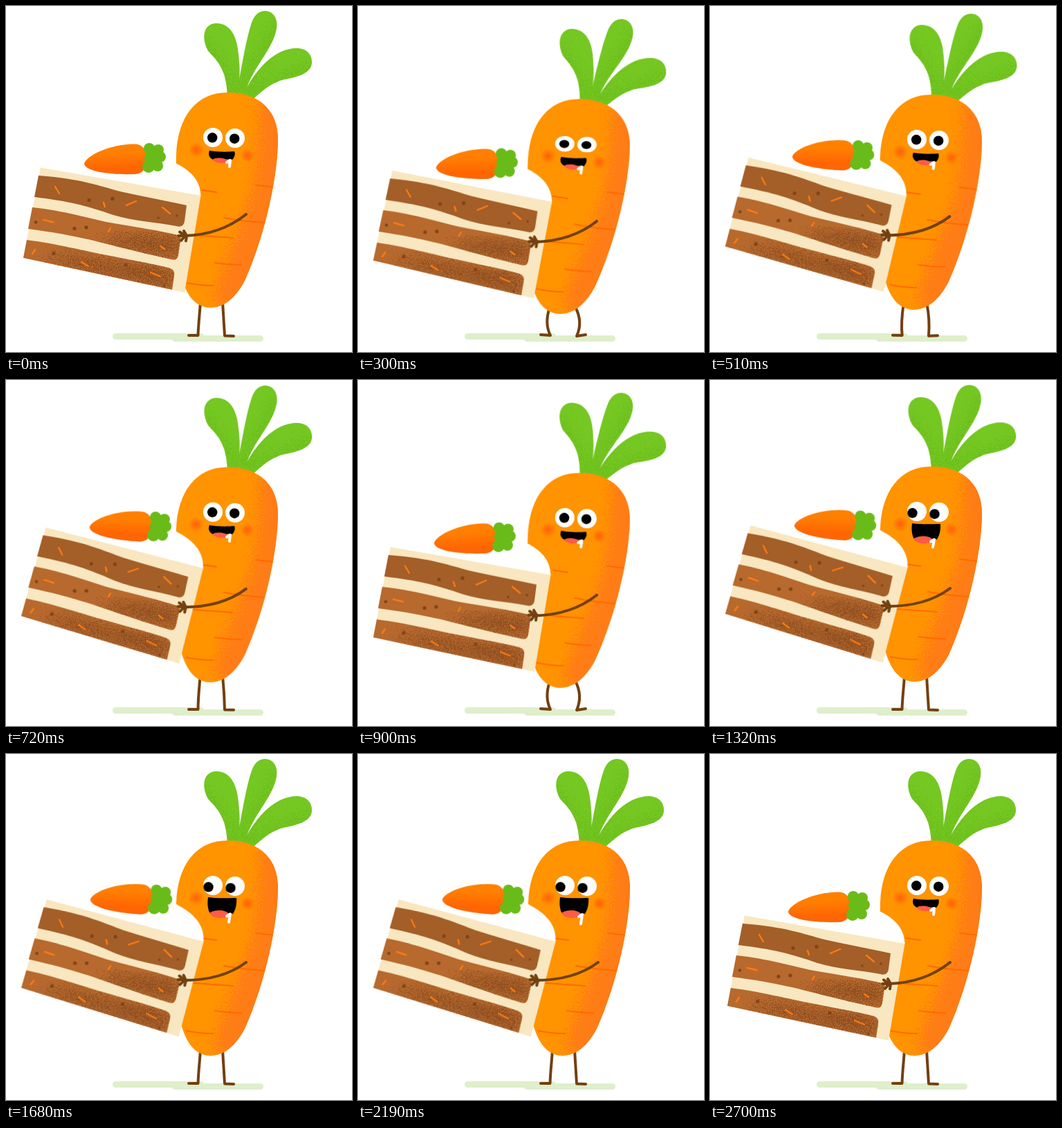
Write an HTML page without scripts that moves like this. It is 500x500 px and loops after 2.73 s.

```html
<!DOCTYPE html>
<html lang="en">
<head>
<meta charset="utf-8">
<title>Carrot with cake</title>
<style>
html, body { margin: 0; width: 100%; height: 100%; overflow: hidden; background: #fff; }
svg { display: block; width: 100vw; height: 100vh; }
.move { animation: 2.73s cubic-bezier(.45, 0, .55, 1) infinite; }
.line { fill: none; stroke-linecap: round; stroke-linejoin: round; }
.limb { stroke: #734010; stroke-width: 4; }
.crease { stroke: #ff6900; stroke-width: 2; }
.shred { stroke: #fa7b12; stroke-width: 2.4; }

/* Body bobs twice, then rests while the carrot stares at the cake. */
.body { animation-name: bob; transform-origin: 320px 180px; }
@keyframes bob {
  0%, 24.2%, 46.4%, 100% { transform: none; }
  10.4%, 34.2% { transform: translateY(9.5px) rotate(.85deg); }
}
.leaves { animation-name: sway; transform-origin: 338px 130px; }
@keyframes sway {
  0%, 25.5%, 51%, 100% { transform: none; }
  12% { transform: rotate(2.2deg); }
  38% { transform: rotate(3deg); }
}
.cake { animation-name: lift; transform-origin: 255px 332px; }
@keyframes lift {
  0%, 97.8%, 100% { transform: none; }
  10.4% { transform: translate(-2.4px, 8.5px) rotate(1.15deg); }
  34.2% { transform: translate(-3px, 8px) rotate(-.2deg); }
  24.2%, 46.9%, 80.2% { transform: translate(-1px, -5.5px) rotate(5.1deg); }
}
.arm { animation-name: arm; }
@keyframes arm {
  0%, 97.8%, 100% { d: path("M347 301C327 317 297 331 258 332"); }
  10.4%, 34.2% { d: path("M345 311C325 327 295 340 255 341"); }
  24.2%, 46.9%, 80.2% { d: path("M347 301C327 316 297 327 257 327"); }
}
.leg-l { animation-name: leg-l; }
@keyframes leg-l {
  0%, 24.2%, 46.4%, 100% { d: path("M281 428C280 444 278 460 277.5 476L264 476"); }
  10.4%, 34.2% { d: path("M277 436C272 450 272 464 278 476L264 475"); }
}
.leg-r { animation-name: leg-r; }
@keyframes leg-r {
  0%, 24.2%, 46.4%, 100% { d: path("M313 428C314 444 315 460 316 476.5L329 477"); }
  10.4%, 34.2% { d: path("M314 435C322 450 322 464 316 477L329 475"); }
}
.eyes { animation-name: blink; transform-origin: 315px 190px; }
@keyframes blink {
  0%, 9.85%, 16.8%, 100% { transform: none; }
  13.35% { transform: scaleY(.12); }
}
.pupils { animation-name: glance; }
@keyframes glance {
  0%, 35.2%, 93%, 100% { transform: none; }
  46.2%, 81.5% { transform: translate(-5.7px, 1.9px); }
}
.mouth { animation-name: mouth; }
@keyframes mouth {
  0%, 35.5%, 96%, 100% { d: path("M294 209C305 211 320 211 330 210C332 214 330 219 327 222C318 220 306 224 299 222C293 219 292 214 294 209"); }
  51%, 81% { d: path("M292 207C305 209 322 208 333 208C334 218 331 226 328 231C320 229 305 235 294 229C291 222 291 214 292 207"); }
}
.tongue { animation-name: tongue; }
@keyframes tongue {
  0%, 35.5%, 96%, 100% { d: path("M298 222C304 218 316 219 322 224C318 228 305 229 298 222"); }
  51%, 81% { d: path("M294 230C300 225 318 224 323 232C318 238 301 240 294 230"); }
}
.drool { animation-name: drool; }
@keyframes drool {
  0%, 35.5%, 96%, 100% { d: path("M319 226L324 223L323 232"); }
  51% { d: path("M319 234L324 231L322 242"); }
  81% { d: path("M319 235L324 232L322 245.5"); }
}
</style>
</head>
<body>
<svg viewBox="0 0 500 500">
  <defs>
    <filter id="spray" x="-30%" y="-30%" width="160%" height="160%" color-interpolation-filters="sRGB">
      <feGaussianBlur stdDeviation="2" result="soft"/>
      <feTurbulence type="fractalNoise" baseFrequency=".7" numOctaves="2" seed="4" result="grain"/>
      <feDisplacementMap in="soft" in2="grain" scale="75" xChannelSelector="R" yChannelSelector="G"/>
    </filter>
    <radialGradient id="blush">
      <stop offset=".2" stop-color="#ff5a0c" stop-opacity=".75"/>
      <stop offset="1" stop-color="#ff5a0c" stop-opacity="0"/>
    </radialGradient>
    <linearGradient id="topping" x1=".4" y1="0" x2=".5" y2="1">
      <stop offset=".3" stop-color="#ff8000"/>
      <stop offset=".8" stop-color="#ff6503"/>
    </linearGradient>
    <path id="torso" d="M246 215C248 160 275 125 320 125C370 125 393 155 393 192C393 245 375 330 345 397C330 425 312 436 296 436C275 436 262 420 254 394C246 370 244 300 246 215"/>
    <path id="greens" d="M320 132C319 98 311 84 292 65C280 42 288 25 304 25C325 25 334 45 336 70C338 88 338 96 337 106C342 80 347 48 355 24C360 10 368 7 375 7C388 8 393 20 391 32C387 60 360 85 348 118C362 92 388 61 420 61C436 61 443 72 442 83C440 98 420 103 403 106C385 110 370 122 356 136Z"/>
    <path id="sponge-2" d="M38 291C85 296 115 306 150 313C190 320 220 324 253 332L249 360C248 365 246 368 238 366C215 361 195 356 170 350C130 340 100 331 32 322Z"/>
    <path id="sponge-3" d="M30 338C75 344 105 352 140 359C180 367 210 372 234 378C242 380 244 384 243 390L240 410L25 364Z"/>
    <clipPath id="in-torso"><use href="#torso"/></clipPath>
    <clipPath id="in-greens"><use href="#greens"/></clipPath>
    <clipPath id="in-sponge-2"><use href="#sponge-2"/></clipPath>
    <clipPath id="in-sponge-3"><use href="#sponge-3"/></clipPath>
  </defs>

  <g class="line" stroke="#dfeecb" stroke-width="9">
    <path d="M158.500 477.500H281.500M244.500 480.500H367.500"/>
  </g>

  <g class="line limb">
    <path class="move leg-l" d="M281 428C280 444 278 460 277.5 476L264 476"/>
    <path class="move leg-r" d="M313 428C314 444 315 460 316 476.5L329 477"/>
  </g>

  <g class="move body">
    <g class="move leaves">
      <use href="#greens" fill="#75c722"/>
      <g clip-path="url(#in-greens)">
        <path class="line" filter="url(#spray)" stroke="#62b515" stroke-opacity=".6" stroke-width="9" d="M289 54C298 80 324 90 327 130M391 26C380 62 352 82 344 126M441 86C424 103 380 104 352 134"/>
      </g>
    </g>
    <use href="#torso" fill="#ff9300"/>
    <g clip-path="url(#in-torso)">
      <path filter="url(#spray)" fill="#ff7c16" d="M368 130C362 200 366 240 348 290C330 340 316 370 300 420L330 460L440 340V110Z"/>
    </g>
    <path class="line crease" d="M283 266L304 269M361 259L385 261.500M315 306Q340 311 373 313M270 331L328 335M302 371Q320 374 340 374M261 400Q280 404 299 404"/>
    <g fill="url(#blush)">
      <circle cx="275" cy="208" r="11"/>
      <circle cx="349" cy="216" r="10"/>
    </g>
    <g class="move eyes">
      <g fill="#fff">
        <circle cx="299" cy="190" r="14"/>
        <circle cx="331" cy="191" r="14"/>
      </g>
      <g class="move pupils">
        <circle cx="298.200" cy="190.300" r="7.200"/>
        <circle cx="330.200" cy="191.700" r="7.200"/>
      </g>
    </g>
    <path class="move mouth" d="M294 209C305 211 320 211 330 210C332 214 330 219 327 222C318 220 306 224 299 222C293 219 292 214 294 209"/>
    <path class="move tongue" fill="#ff5b45" d="M298 222C304 218 316 219 322 224C318 228 305 229 298 222"/>
    <path class="move drool line" stroke="#fff" stroke-width="4" d="M319 226L324 223L323 232"/>
  </g>

  <g class="move cake">
    <path fill="#fff" d="M50 234L60 214L220 212L238 224C262 234 281 248 281.500 275Z"/>
    <path fill="#f8e7c0" d="M50 233.500L281.500 274L258 414L25 364Z"/>
    <path fill="#a45e28" d="M47 245C110 250 135 260 165 268C195 275 230 281 261 288L258 311C257 318 252 320 246 318C215 312 185 311 155 302C115 288 90 282 41 276Z"/>
    <use href="#sponge-2" fill="#b7692e"/>
    <use href="#sponge-3" fill="#b7692e"/>
    <g fill="#8b4d20" fill-opacity=".9">
      <g clip-path="url(#in-sponge-2)">
        <path filter="url(#spray)" d="M144 338C180 330 215 335 252 336L248 360C215 354 180 353 144 344Z"/>
      </g>
      <g clip-path="url(#in-sponge-3)">
        <path filter="url(#spray)" d="M60 362C100 358 140 372 180 374C205 374 225 380 242 384L236 406C180 392 120 382 60 368Z"/>
      </g>
    </g>
    <g fill="#7f4517">
      <circle cx="120" cy="280.500" r="2.600"/>
      <circle cx="154" cy="278.500" r="2.700"/>
      <circle cx="220" cy="306" r="1.700"/>
      <circle cx="247" cy="303" r="1.700"/>
      <circle cx="43" cy="312.500" r="2.300"/>
      <circle cx="99" cy="321.500" r="2.600"/>
      <circle cx="116" cy="320" r="2.600"/>
      <circle cx="69" cy="357.500" r="2.500"/>
      <circle cx="173" cy="374" r="2.500"/>
      <circle cx="229" cy="404" r="1.700"/>
    </g>
    <path class="line shred" d="M71 261L77 271M141 284L143 290M174 288L188 282M226 291L237 300M54 309L68 312.500M148 326L151 321M223 347L229 351M38 358L42 352M109 370L119 376M209 385L223 391"/>

    <path fill="url(#topping)" d="M113 228C116 216 150 200 184 199.500C196 199 203 206 203 220C203 235 198 243 184 243C155 244 115 240 113 228"/>
    <g fill="#69bb19">
      <circle cx="207" cy="206" r="8"/>
      <circle cx="220" cy="208" r="8"/>
      <circle cx="223" cy="218" r="8"/>
      <circle cx="219" cy="231" r="8"/>
      <circle cx="206" cy="232" r="9"/>
      <circle cx="211" cy="219" r="11"/>
    </g>
    <path class="line limb" d="M262 332H249.500M259 332L251 326.500M259 332L253 339M261 332L257 325M261 332L260 339.500"/>
  </g>

  <path class="move arm line limb" d="M347 301C327 317 297 331 258 332"/>
</svg>
</body>
</html>
```
